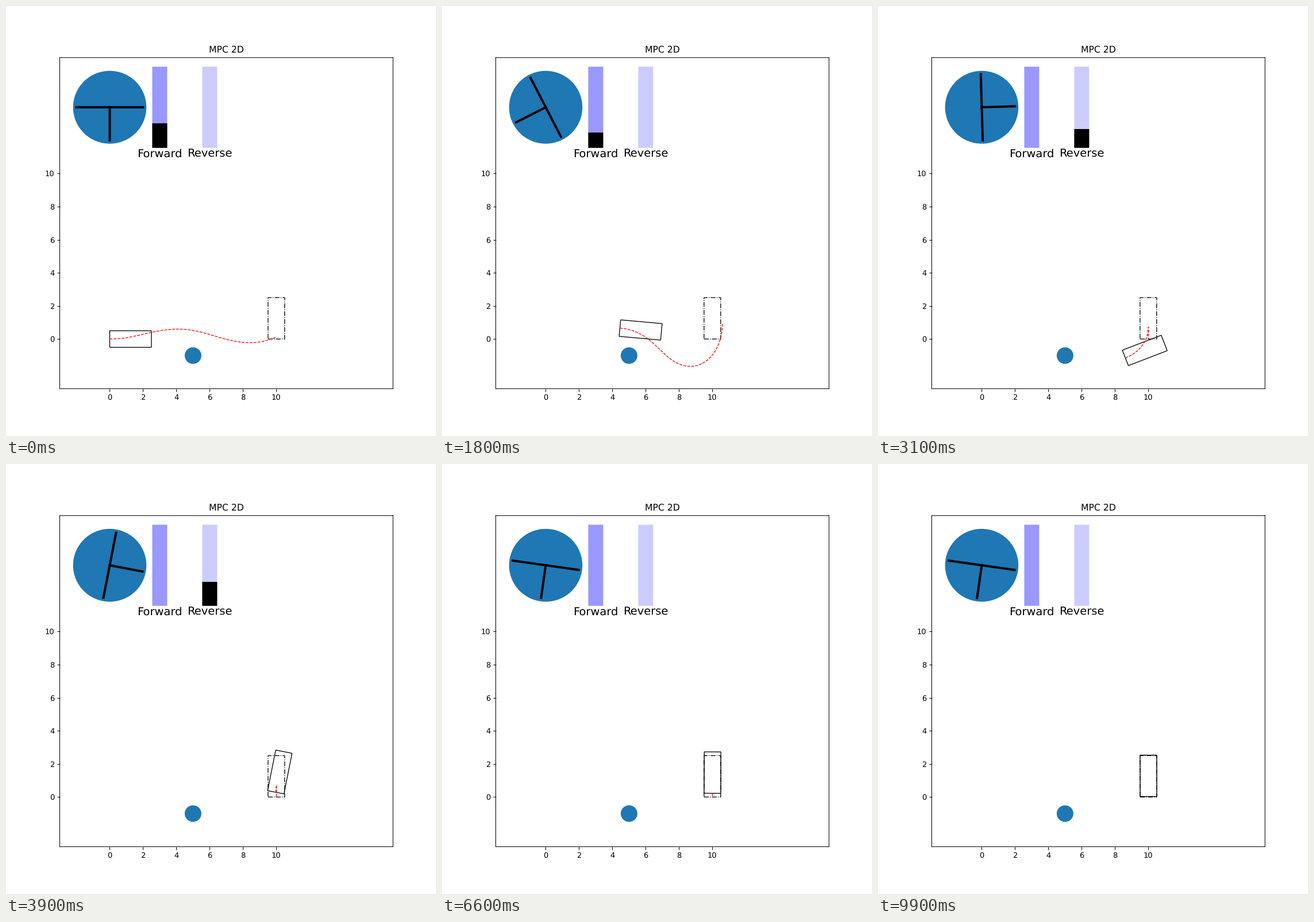
Write a matplotlib script that moves like this. It is 748x748 px and loops after 10000 ms.

```python
import numpy as np
import matplotlib.pyplot as plt
from matplotlib.animation import FuncAnimation
from matplotlib.patches import Circle, Rectangle

# Unsnapped strokes and unhinted text keep sub-pixel positions
plt.rcParams.update({'path.snap': False, 'text.hinting': 'none'})

FRAMES = 100
CAR_W, CAR_L = 1.0, 2.5
UP = np.pi / 2
LOCK = 1.6
HUB = (0, 14)
BAR_Y = 12
PASS_OBSTACLE, APPROACH, FLIP = 18, 31, 45

# Step, rear-axle x, y, heading, distance per step
POSES = np.array([
    (0, 0, 0, 0, .03),
    (12, 2.34, .37, .24, .34),
    (18, 4.45, .66, -.09, .355),
    (25, 6.60, -.72, -.665, .37),
    (31, 8.62, -1.14, .369, .35),
    (39, 9.965, .288, 1.375, .15),
    (52, 10.005, .525, 1.553, -.035),
])

# Planned bend, dip and end point (x, y, heading): start, mid-way, approach
PLAN_START = np.array([(4.1, .6, 0), (8.45, -.22, 0), (9.95, .1, .35)])
PLAN_MID = np.array([(6.55, -.35, -.75), (8.7, -1.65, 0), (10.6, 1, 1.62)])
PLAN_PARK = np.array([(6.55, -.35, -.75), (8.62, -1.1, .37), (10, .72, UP)])


def wheel(k):
    """Growing sway, full lock into the goal, then a damped return."""
    if k >= FLIP:
        d = k - FLIP
        return -.141 - 1.45 * np.exp(-d / 2.44) * np.cos(.42 * d)
    j = min(k, 27)
    sway = np.clip(.067 * j * np.sin(np.pi * j / 11), -LOCK, LOCK)
    return sway - .0275 * max(0, k - APPROACH)


def pedal(k):
    """Positive drives forward, negative reverses."""
    return np.interp(k, [0, 10, 18, 25, 39, 50, 52, 60],
                     [.725, .95, .03, 0, -.68, 0, .117, 0])


def hermite(p0, m0, p1, m1, t):
    return ((2*t**3 - 3*t**2 + 1) * p0 + (t**3 - 2*t**2 + t) * m0
            + (3*t**2 - 2*t**3) * p1 + (t**3 - t**2) * m1)


def rates(key):
    """Bicycle model: change of x, y and heading per step."""
    k, _, _, psi, w = key
    return w * np.array([np.cos(psi), np.sin(psi), np.tan(wheel(k) / 2) / 2])


def pose(k):
    last = POSES[-1]
    if k >= last[0]:
        d = k - last[0]
        return np.array([last[1], last[2] * np.exp(-.06 * d),
                         UP - .018 * np.exp(-.12 * d)])
    i = np.searchsorted(POSES[:, 0], k, side='right') - 1
    a, b = POSES[i], POSES[i + 1]
    span = b[0] - a[0]
    return hermite(a[1:4], rates(a) * span, b[1:4], rates(b) * span,
                   (k - a[0]) / span)


def link(a, b):
    """Smooth curve between two (x, y, heading) points."""
    pull = 1.12 * np.hypot(*(b[:2] - a[:2]))
    ma, mb = (pull * np.array([np.cos(p[2]), np.sin(p[2])]) for p in (a, b))
    return hermite(a[:2], ma, b[:2], mb, np.linspace(0, 1, 16)[:, None])


def plan(k, car):
    if k >= FLIP:
        return np.array([car[:2], (10, .1 * car[1])])
    if k < PASS_OBSTACLE:
        t = k / PASS_OBSTACLE
        stops = PLAN_START + (PLAN_MID - PLAN_START) * t**3
        stops[-1, 0] += 1.45 * np.sin(np.pi * t)
        end = stops[-1, :2]
    else:
        t = min(1, (k - PASS_OBSTACLE) / (APPROACH - PASS_OBSTACLE))
        stops = PLAN_MID + (PLAN_PARK - PLAN_MID) * t
        end = stops[-1, :2] * (1, 1 - t)
    ahead = [s for s in stops[:-1] if s[0] > car[0] + 1.2] + [stops[-1]]
    curves = [link(a, b) for a, b in zip([car, *ahead], ahead)]
    return np.vstack([*curves, end])


def rear_left(x, y, psi):
    return x - np.sin(psi) * CAR_W / 2, y + np.cos(psi) * CAR_W / 2


fig, ax = plt.subplots(figsize=(8, 8), dpi=93.5)
ax.set(xlim=(-3, 17), ylim=(-3, 17), title='MPC 2D',
       xticks=range(0, 11, 2), yticks=range(0, 11, 2))

car_box = ax.add_patch(Rectangle((0, 0), CAR_W, CAR_L, fill=False))
ax.add_patch(Rectangle(rear_left(10, 0, UP), CAR_W, CAR_L, fill=False,
                       ls='dashdot'))
ax.add_patch(Circle(HUB, 2.2))
ax.add_patch(Circle((5, -1), .5))
path, = ax.plot([], [], 'r--', lw=1)
spokes = [ax.plot([], [], 'k', lw=3)[0] for _ in range(3)]

bars = []
for x, label, alpha in ((3, 'Forward', .4), (6, 'Reverse', .2)):
    ax.plot([x, x], [BAR_Y, BAR_Y + 4], 'b', lw=20, alpha=alpha)
    bars.append(ax.plot([], [], 'k', lw=20)[0])
    ax.text(x, 11, label, fontsize=15, ha='center')


def update(k):
    car = pose(k)
    car_box.set_xy(rear_left(*car))
    car_box.angle = np.rad2deg(car[2]) - 90
    path.set_data(*plan(k, car).T)

    for spoke, turn in zip(spokes, (0, np.pi, -UP)):
        a = wheel(k) + turn
        spoke.set_data([HUB[0], HUB[0] + 2 * np.cos(a)],
                       [HUB[1], HUB[1] + 2 * np.sin(a)])

    push = pedal(k)
    for bar, x, u in zip(bars, (3, 6), (push, -push)):
        on = u > 1e-6
        bar.set_data([x, x] if on else [],
                     [BAR_Y, BAR_Y + .8 * u] if on else [])
    return [car_box, path, *spokes, *bars]


anim = FuncAnimation(fig, update, frames=FRAMES, interval=100, repeat=True)
plt.show()
```
